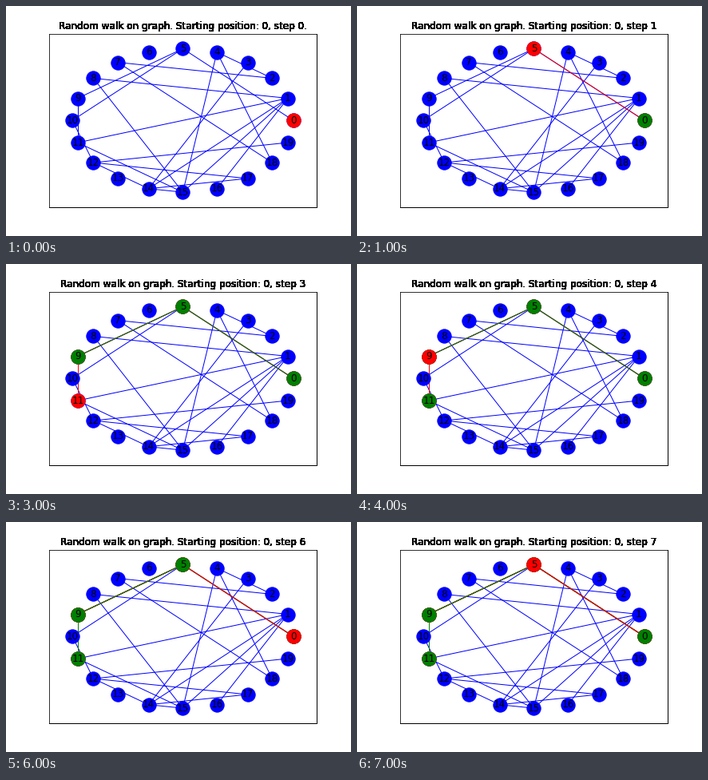
A matplotlib script that plays this animation: 432x288 px, repeating every 8000 ms.

```python
import numpy as np
import matplotlib.pyplot as plt
from matplotlib.animation import FuncAnimation
from matplotlib.collections import LineCollection

NODES = 20
STEPS = 8
# The graph's links, written as strokes from node to node.
STROKES = [
    "0 5 10 12 17 14 15 8 1 11 9 5",
    "11 15 4 2 7 18 4",
    "19 12 14 3",
    "14 1 15",
    "1 16",
]
ROUTE = [0, 5, 9, 11]  # walked back and forth
LIMIT = 1.21
TITLE_LAYERS = 40  # overlaid copies harden the soft text edges to black

angle = 2 * np.pi * np.arange(NODES) / NODES
pos = np.column_stack([np.cos(angle), np.sin(angle)])

plt.rcParams["font.family"] = "DejaVu Sans"
fig = plt.figure(figsize=(6, 4), dpi=72, facecolor="white")
ax = fig.add_axes([0.125, 0.125, 0.775, 0.755])
for side in ("right", "bottom"):
    ax.spines[side].set_linewidth(1)


def walker(step):
    last = len(ROUTE) - 1
    return ROUTE[last - abs(last - step % (2 * last))]


def draw_path(nodes, color):
    lines = [pos[list(pair)] for pair in zip(nodes, nodes[1:])]
    ax.add_collection(LineCollection(lines, colors=color, linewidths=1, zorder=1))


def draw_nodes(nodes, color):
    ax.scatter(*pos[nodes].T, s=300, c=color, zorder=2)


def draw_title(text):
    for _ in range(TITLE_LAYERS):
        ax.annotate(text, (0.5, 1), xycoords="axes fraction", xytext=(0, 6),
                    textcoords="offset points", size=12,
                    ha="center", va="baseline", annotation_clip=False)


def update(step):
    ax.clear()
    ax.set(xlim=(-LIMIT, LIMIT), ylim=(-LIMIT, LIMIT), xticks=[], yticks=[])
    for stroke in STROKES:
        draw_path([int(n) for n in stroke.split()], "blue")
    draw_nodes(list(range(NODES)), "blue")

    # Each step paints over the trail left by the previous ones.
    walk = [walker(k) for k in range(step + 1)]
    draw_nodes(walk[:1], "red")
    for k in range(1, step + 1):
        draw_path(walk[max(k - 2, 0):k], "green")
        draw_path(walk[k - 1:k + 1], "red")
        draw_nodes([walk[k - 1]], "green")
        draw_nodes([walk[k]], "red")

    for i, (x, y) in enumerate(pos):
        ax.text(x, y, str(i), size=12, ha="center", va="center", zorder=3)
    end = "" if step else "."
    draw_title(f"Random walk on graph. Starting position: {walk[0]}, step {step}{end}")
    return []


anim = FuncAnimation(fig, update, frames=STEPS, interval=1000,
                     repeat=True, repeat_delay=0, blit=False)
plt.show()
```
